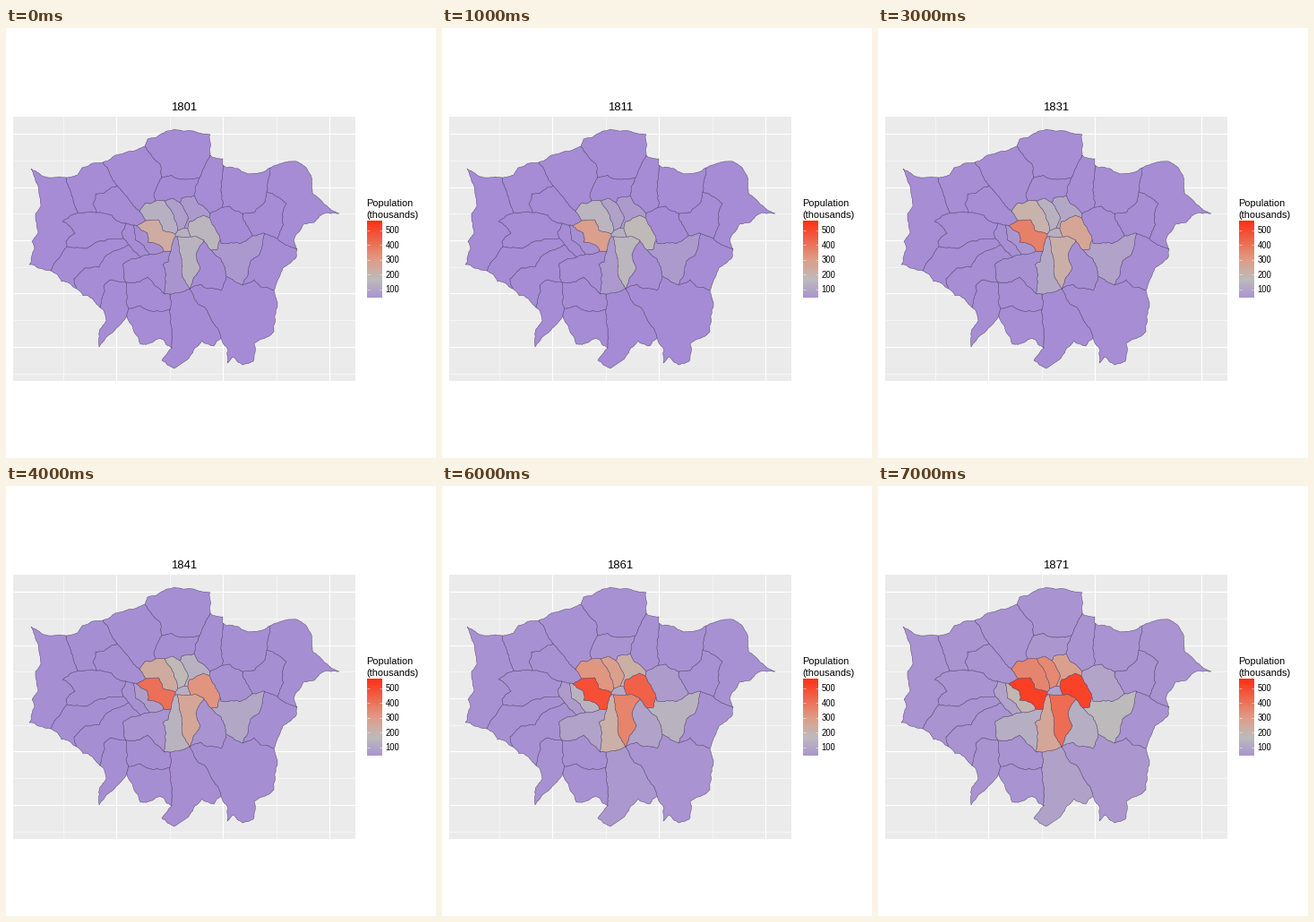
Write a matplotlib script that moves like this. It is 480 px wide and 480 px high and loops after 8000 ms.

```python
from itertools import combinations

import numpy as np
import matplotlib.pyplot as plt
from matplotlib.animation import FuncAnimation
from matplotlib.collections import PolyCollection
from matplotlib.colors import LinearSegmentedColormap
from matplotlib.patches import Rectangle

SIZE = 480
DECADES = 8
FIRST_YEAR = 1801
LOW, HIGH = 42, 560
FONT = "Liberation Sans"

rng = np.random.default_rng(7)

# Points where three or more areas meet; two areas sharing two corners share a border
corners = {
    "hou hil out": (50, 271), "hil har out": (67, 167), "har bnt out": (108, 150),
    "bnt enf out": (155, 132), "enf wal out": (228, 142), "wal red out": (242, 153),
    "red hav out": (295, 156), "hav bex out": (325, 247), "bex bro out": (299, 293),
    "bro cro out": (240, 346), "cro sut out": (185, 357), "sut kin out": (135, 322),
    "kin ric out": (105, 312), "ric hou out": (79, 291),
    "hil har eal": (80, 206), "hil hou eal": (68, 244), "har bnt bre": (124, 176),
    "har bre eal": (101, 206), "eal bre ham": (134, 218), "eal ham hou": (131, 235),
    "hou ham ric": (137, 242), "ric ham wan": (150, 256), "bre ham ken": (143, 220),
    "bre ken wes": (146, 221), "bre cam wes": (156, 215), "bnt bre cam": (149, 205),
    "bnt hgy cam": (167, 193), "bnt enf hgy": (174, 167), "enf hgy wal": (216, 167),
    "hgy wal hac": (210, 187), "hgy hac isl": (194, 195), "hgy isl cam": (177, 193),
    "cam isl cty": (192, 226), "cam cty wes": (189, 230), "isl cty hac": (199, 223),
    "hac cty tow": (203, 224), "cty tow sou": (206, 233), "cty wes lam": (189, 233),
    "cty lam sou": (191, 233), "wes lam wan": (184, 249), "wes wan ken": (176, 249),
    "ken wan ham": (160, 253), "tow sou lew": (221, 237), "tow lew gre": (229, 248),
    "tow gre new": (239, 236), "hac tow new": (227, 212), "hac wal new": (228, 207),
    "wal red new": (242, 200), "red new brk": (264, 207), "new brk gre": (275, 232),
    "brk gre bex": (288, 229), "brk bex hav": (303, 235), "red brk hav": (291, 183),
    "gre bex bro": (264, 287), "lew gre bro": (246, 277),
    "lam sou lew bro cro": (205, 291), "lam cro mer": (183, 297),
    "lam mer wan": (177, 297), "wan mer kin ric": (134, 284),
    "mer kin sut": (137, 313), "mer sut cro": (183, 314),
}
bends = {}


def bend(pair, *xy):
    bends[frozenset(pair.split())] = np.reshape(xy, (-1, 2)).astype(float)


# Outer edge
bend("hil out", 36, 268, 26, 264, 32, 246, 29, 238, 36, 228, 33, 207, 39, 199, 28, 157, 47, 167)
bend("har out", 80, 164, 85, 156)
bend("bnt out", 131, 140, 146, 136)
bend("enf out", 158, 124, 188, 113, 228, 119)
bend("wal out", 242, 146)
bend("red out", 246, 156, 270, 163, 286, 161)
bend("hav out", 325, 149, 340, 164, 342, 184, 372, 207, 353, 208, 344, 217, 332, 219, 323, 232)
bend("bex out", 324, 256, 309, 268, 303, 282)
bend("bro out", 303, 306, 299, 339, 277, 352, 276, 372, 264, 376, 253, 367, 247, 374)
bend("cro out", 232, 355, 219, 349, 205, 367, 188, 380, 174, 371)
bend("sut out", 173, 347, 150, 353)
bend("kin out", 112, 345, 104, 356, 104, 340, 112, 327)
bend("ric out", 96, 302)
bend("hou out", 62, 283)

# West
bend("hil har", 73, 187)
bend("hil eal", 63, 216, 77, 229, 67, 238)
bend("hil hou", 60, 256)
bend("har bre", 112, 182, 100, 185, 97, 197)
bend("eal bre", 118, 209, 123, 215)
bend("eal ham", 129, 228)
bend("eal hou", 90, 246)
bend("hou ric", 127, 247, 110, 256, 104, 267, 88, 268, 76, 280)
bend("ric wan", 131, 263)
bend("ric kin", 117, 281, 109, 288)

# North
bend("bnt bre", 137, 191)
bend("bnt cam", 155, 196)
bend("bnt hgy", 165, 187)
bend("bnt enf", 172, 152)
bend("hgy hac", 196, 190)
bend("hgy isl", 185, 190)
bend("hac wal", 214, 195)
bend("wal red", 240, 172)

# Centre
bend("cam wes", 170, 214, 175, 226, 183, 228)
bend("wes ken", 171, 242, 158, 239, 158, 229)
bend("ken ham", 145, 237)
bend("isl hac", 203, 214)
bend("hac tow", 205, 216, 220, 209)
bend("tow gre", 236, 247)
bend("tow new", 230, 219)

# East
bend("red new", 250, 199)
bend("red brk", 277, 206, 289, 194)
bend("red hav", 293, 168)
bend("new brk", 270, 222)
bend("new gre", 240, 240, 263, 240)
bend("brk hav", 310, 219, 313, 196, 298, 185)
bend("gre bex", 286, 243, 282, 254, 273, 260, 270, 276)
bend("bex bro", 277, 281, 284, 289)

# South
bend("gre lew", 240, 258)
bend("lew bro", 240, 293, 225, 291, 217, 286)
bend("sou lew", 212, 254, 217, 268)
bend("lam sou", 197, 266, 197, 278)
bend("lam wan", 181, 261, 175, 264)
bend("wan mer", 164, 284, 158, 278, 150, 283)
bend("mer sut", 150, 310, 158, 315)
bend("sut cro", 185, 335)
bend("bro cro", 214, 308, 222, 312)


def gap(a, b):
    return np.hypot(*(b - a))


def rough(a, b):
    """Midpoint displacement: a ragged run from a up to, not including, b."""
    if gap(a, b) < 3:
        return [a]
    side = np.array([a[1] - b[1], b[0] - a[0]])
    mid = (a + b) / 2 + side * rng.normal(0, 0.06)
    return rough(a, mid) + rough(mid, b)


def border(start, end, via):
    if len(via) and gap(start, via[0]) + gap(via[-1], end) > gap(end, via[0]) + gap(via[-1], start):
        via = via[::-1]
    path = np.vstack([start, via, end])
    points = [p for a, b in zip(path[:-1], path[1:]) for p in rough(a, b)]
    return np.array(points + [end])


codes = sorted({c for key in corners for c in key.split()})
borders = {}
for pair in map(frozenset, combinations(codes, 2)):
    ends = [np.array(xy, float) for key, xy in corners.items() if pair <= set(key.split())]
    if len(ends) == 2:
        borders[pair] = border(*ends, bends.get(pair, np.empty((0, 2))))
codes.remove("out")


def ring(code):
    """Join all borders of one area into a closed outline."""
    parts = [p for pair, p in borders.items() if code in pair]
    path = parts.pop(0)
    while parts:
        end = path[-1]
        nearest = [min(gap(p[0], end), gap(p[-1], end)) for p in parts]
        part = parts.pop(int(np.argmin(nearest)))
        if gap(part[-1], end) < gap(part[0], end):
            part = part[::-1]
        path = np.vstack([path, part[1:]])
    return path


# Thousands of people: first decade, last decade, how late the growth comes
growth = {
    "wes": (231, 522, 0.9), "tow": (150, 512, 1.4), "cam": (128, 355, 1.3),
    "isl": (68, 345, 1.7), "hac": (52, 280, 1.9), "sou": (138, 415, 1.5),
    "lam": (38, 258, 1.4), "gre": (50, 162, 1.5), "ken": (18, 190, 2.3),
    "cty": (129, 75, 5), "ham": (10, 82, 2.5), "wan": (14, 122, 3),
    "lew": (12, 122, 3), "new": (7, 88, 3), "cro": (8, 80, 3.5),
    "hgy": (8, 46, 2.5), "bro": (8, 46, 2.5),
}
RURAL = (9, 34, 2)


def people(code, i):
    first, last, power = growth.get(code, RURAL)
    return first + (last - first) * (i / (DECADES - 1)) ** power


stops = [(0, "#a489d6"), (165, "#bdbbbb"), (300, "#df9c86"), (HIGH, "#ff2f14")]
cmap = LinearSegmentedColormap.from_list("heat", [(v / HIGH, c) for v, c in stops], N=512)

fig = plt.figure(figsize=(SIZE / 72, SIZE / 72), dpi=72, facecolor="white")
ax = fig.add_axes([0, 0, 1, 1])
ax.axis("off")

# Grey panel with its grid
ax.add_patch(Rectangle((8, 99), 382, 295, fc="#ebebeb", ec="none", zorder=0))


def grid(xs, ys, width):
    ax.vlines(xs, 99, 394, color="white", lw=width, zorder=1)
    ax.hlines(ys, 8, 390, color="white", lw=width, zorder=1)


grid(63.5 + 119 * np.arange(3), 148 + 59.4 * np.arange(5), 0.55)
grid(123.2 + 119 * np.arange(3), 118.2 + 59.4 * np.arange(5), 1.1)

areas = PolyCollection([ring(c) for c in codes], edgecolors="#4d4068",
                       linewidths=0.45, zorder=2)
ax.add_collection(areas)

# Legend
ramp = np.linspace(HIGH, LOW, 200)[:, None] / HIGH
ax.imshow(ramp, cmap=cmap, vmin=0, vmax=1, extent=(403, 420, 301.5, 215.5),
          aspect="auto", interpolation="bilinear", zorder=2)
for value in range(100, 600, 100):
    y = 291.8 - (value - 100) * 0.1645
    ax.hlines([y, y], [403, 416.6], [406.4, 420], color="white", lw=0.5, zorder=3)
    ax.text(423.5, y + 3.2, str(value), fontname=FONT, fontsize=9.5)
ax.text(402.5, 199, "Population", fontname=FONT, fontsize=11)
ax.text(402.5, 212, "(thousands)", fontname=FONT, fontsize=11)
title = ax.text(199, 92, "", fontname=FONT, fontsize=13, ha="center")

ax.set_xlim(0, SIZE)
ax.set_ylim(SIZE, 0)


def draw(i):
    areas.set_facecolor([cmap(people(c, i) / HIGH) for c in codes])
    title.set_text(str(FIRST_YEAR + 10 * i))
    return areas, title


anim = FuncAnimation(fig, draw, frames=DECADES, interval=1000, repeat=True, repeat_delay=0)
plt.show()
```
